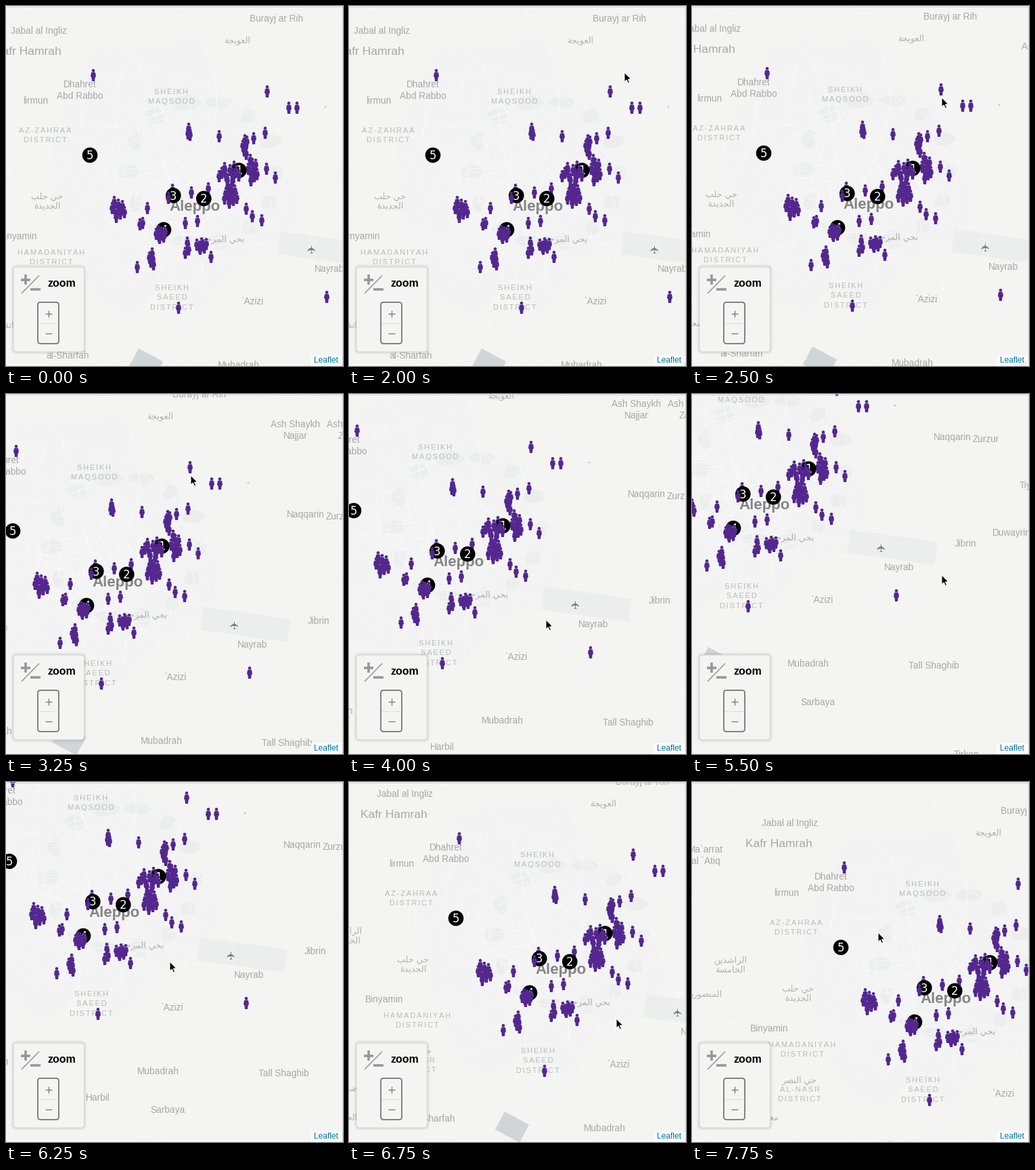
Write a matplotlib script that moves like this. It is 498 by 531 pixels and loops after 8000 ms.

```python
import numpy as np
import matplotlib.pyplot as plt
from matplotlib.animation import FuncAnimation
from matplotlib.collections import LineCollection
from matplotlib.patches import Circle, FancyBboxPatch, PathPatch, Polygon, Rectangle
from matplotlib.path import Path
from matplotlib.transforms import Affine2D

W, H = 498, 531
FRAMES, STEP = 32, 250
SANS = ["Liberation Sans", "DejaVu Sans"]
PURPLE, PLACE, DISTRICT = "#54278f", "#a8a8a8", "#b7baba"

fig = plt.figure(figsize=(W / 72, H / 72), dpi=72)
ax = fig.add_axes([0, 0, 1, 1])
ax.set_xlim(0, W)
ax.set_ylim(H, 0)
ax.axis("off")
fig.patch.set_facecolor("#f4f4f3")

pan = Affine2D()
world = pan + ax.transData
rng = np.random.default_rng(7)


# ---- map ground -------------------------------------------------------
def blob(x, y, rx, ry, color, n=9):
    a = np.linspace(0, 2 * np.pi, n, endpoint=False)
    r = rng.uniform(0.75, 1.1, n)
    ax.add_patch(Polygon(np.c_[x + rx * r * np.cos(a), y + ry * r * np.sin(a)],
                         fc=color, transform=world, zorder=1))


def slab(x, y, w, h, angle, color):
    ax.add_patch(Rectangle((x - w / 2, y - h / 2), w, h, angle=angle, fc=color,
                           rotation_point="center", transform=world, zorder=1))


def streets(count, center, spread, color, lw):
    """Short streets following a locally rotated grid."""
    c = rng.normal(center, spread, (count, 2))
    a = 0.5 * np.sin(c[:, 0] / 70) + 0.4 * np.cos(c[:, 1] / 60)
    a += np.pi / 2 * rng.integers(0, 2, count)
    d = np.c_[np.cos(a), np.sin(a)] * rng.uniform(5, 20, (count, 1))
    ax.add_collection(LineCollection(np.stack([c - d, c + d], 1), colors=color,
                                     linewidths=lw, transform=world, zorder=2))


def highways(x, y, count):
    """Winding radial roads that leave the middle of the city."""
    r = np.linspace(30, 480, 60)
    for k in range(count):
        a = 2 * np.pi * k / count + 0.25 * np.sin(r / 90 + k)
        ax.plot(x + r * np.cos(a), y + r * np.sin(a), color="#f9f9f9", lw=1.1,
                transform=world, zorder=2)


blob(235, 255, 190, 200, "#f2f3f2", 24)
for angle in np.linspace(0, 2 * np.pi, 14, endpoint=False):
    blob(290 + 110 * np.cos(angle), 245 + 105 * np.sin(angle),
         rng.uniform(10, 22), rng.uniform(8, 16), "#eceeee")
slab(468, 358, 130, 34, 8, "#eceded")
slab(207, 528, 41, 30, 28, "#d0d6d8")
streets(560, (240, 260), (85, 95), "#f9f9f9", 0.8)
streets(220, (300, 300), (260, 200), "#f0f1f1", 0.7)
highways(260, 290, 9)
ax.add_patch(Circle((472, 149), 1.6, fc="#cfcfcf", transform=world, zorder=4))


# ---- labels -----------------------------------------------------------
def label(lines, x, y, size=13.6, gap=16.7, color=PLACE, ha="center", family=SANS, **kw):
    for i, line in enumerate(lines.split("/")):
        ax.text(x, y + i * gap + 0.36 * size, line, size=size, color=color, ha=ha,
                va="baseline", family=family, transform=world, zorder=5, **kw)


def district(lines, x, y):
    spaced = "/".join("\u2006".join(s) for s in lines.split("/"))
    label(spaced, x, y, 11, 14.5, DISTRICT)


def arabic_forms():
    """First presentation form and form count of every letter."""
    two = "آأؤإاةدذرزوى"
    forms, code = {}, 0xFE80
    for u in [*range(0x621, 0x63B), *range(0x641, 0x64B)]:
        ch = chr(u)
        n = 1 if u == 0x621 else 2 if ch in two else 4
        forms[ch] = code, n
        code += n
    return forms


FORMS = arabic_forms()


def joined(text):
    """Join the letters and put them in visual order."""
    out = []
    for i, ch in enumerate(text):
        if ch in FORMS:
            code, n = FORMS[ch]
            before = i > 0 and FORMS.get(text[i - 1], (0, 0))[1] == 4
            after = n == 4 and FORMS.get(text[i + 1:i + 2], (0, 0))[1] > 1
            ch = chr(code + before + 2 * after)
        out.append(ch)
    return "".join(reversed(out))


def arab(lines, x, y, size=12.8, ha="center"):
    label("/".join(map(joined, lines.split("/"))), x, y, size, 14, "#b0b2b2", ha,
          "DejaVu Sans")


label("Jabal al Ingliz", 48, 36)
label("Burayj ar Rih", 400, 18)
label("lirmun", 44, 139)
label("Binyamin", 18, 339)
label("`Azizi", 364, 435)
label("Nayrab", 478, 387)
label("Jibrin", 576, 352)
label("Naqqarin", 557, 195)
label("Zurzur", 606, 198)
label("Mubadrah", 344, 529)
label("Tall Shaghib", 529, 532)
label("Sarbaya", 358, 586)
label("al-Sharfah", 91, 515)
label("Harbil", 255, 568)
label("Tirkan", 578, 663)
label("Tiyarah", 656, 266, ha="left")
label("Duwayrinah", 616, 336, ha="left")
label("Kafr Hamrah", 32, 66, 17.4)
label("Aleppo", 279, 294, 22.3, color="#858585", weight="bold")
label("Dhahret/Abd Rabbo", 109, 115)
label("Ash Shaykh/Najjar", 542, 62)
label("Ash Shaykh/Zayyat", 625, 62)
label("Ma`arrat/al `Atiq", -76, 75)
district("SHEIKH/MAQSOOD", 244, 126)
district("AZ-ZAHRAA/DISTRICT", 58, 183)
district("HAMADANIYAH/DISTRICT", 67, 363)
district("SHEIKH/SAEED/DISTRICT", 245, 415)
district("AL-NASR/DISTRICT", 63, 429)
arab("العويجة", 342, 50)
arab("حي حلب/الجديدة", 61, 280)
arab("بحي المرجة", 321, 343)
arab("الراشدين/الخامسة", -39, 238)
arab("حي النصر", 63, 415)
arab("المنصورة", -76, 288)
arab("معراتة عرضة", 32, 470, ha="right")
arab("العامرية", -22, 513, ha="right")
ax.text(452.5, 358, "\u2708", size=16, rotation=90, color="#757575", ha="center",
        va="center", family="DejaVu Sans", transform=world, zorder=5)


# ---- markers ----------------------------------------------------------
side = np.array([(2.6, -4.2), (3.2, -3), (4, 1.8), (2.6, 3.6), (2, 9)])
body = np.r_[side, side[::-1] * (-1, 1)]
PERSON = Path.make_compound_path(Path(body, closed=False), Path.circle((0, -6.7), 2.3))


def depth(y):
    """Markers further south lie on top."""
    return 10 + y / 1000


def person(x, y):
    shape = PERSON.transformed(Affine2D().translate(x, y))
    ax.add_patch(PathPatch(shape, fc=PURPLE, ec="none", transform=world, zorder=depth(y)))


def crowd(n, x, y, rx, ry):
    """People spread evenly over an ellipse by the golden angle."""
    i = np.arange(n)
    r, a = np.sqrt((i + 0.5) / n), 2.4 * i
    for px, py in zip(x + rx * r * np.cos(a), y + ry * r * np.sin(a)):
        person(round(px), round(py))


def stop(digit, x, y):
    ax.add_patch(Circle((x, y), 11.3, fc="black", transform=world, zorder=depth(y)))
    ax.text(x, y + 6, str(digit), size=16.5, color="white", ha="center", va="baseline",
            family="DejaVu Sans", transform=world, zorder=depth(y) + 1e-4)


for spot in [(129, 102), (386, 126), (418, 150), (430, 150), (383, 187), (315, 192),
             (366, 195), (385, 240), (398, 253), (274, 275), (299, 269), (246, 271),
             (240, 283), (209, 298), (265, 320), (283, 317), (355, 299), (364, 310),
             (378, 316), (303, 370), (194, 385), (255, 445), (474, 429)]:
    person(*spot)
crowd(4, 270, 186, 3, 6)
crowd(9, 165, 300, 11, 13)
crowd(2, 200, 320, 3, 4)
crowd(8, 229, 337, 9, 6)
crowd(5, 216, 373, 4, 12)
crowd(7, 289, 353, 9, 5)
crowd(3, 268, 359, 5, 11)
crowd(6, 353, 208, 4, 16)
crowd(9, 364, 242, 8, 18)
crowd(12, 330, 247, 18, 12)
crowd(10, 332, 278, 10, 16)
stop(5, 124, 220)
stop(3, 247.3, 279.5)
stop(2, 292.3, 284)
stop(1, 344.3, 242.5)
stop(4, 233, 330)


# ---- fixed controls ---------------------------------------------------
def box(x0, y0, x1, y1, r, z, **kw):
    ax.add_patch(FancyBboxPatch((x0, y0), x1 - x0, y1 - y0, zorder=z,
                                boxstyle=f"round,pad=0,rounding_size={r}", **kw))


def bar(x0, y0, x1, y1, color, lw):
    ax.plot([x0, x1], [y0, y1], color=color, lw=lw, solid_capstyle="butt", zorder=23)


ICON, EDGE = "#97979b", "#77777b"
for g in range(1, 5):
    box(11 - g, 385 - g, 115.5 + g, 510 + g, 5 + g, 20, fc="black", ec="none", alpha=0.025)
box(11, 385, 115.5, 510, 5, 21, fc="#f4f4f3", ec="#cccccc", lw=0.6)
bar(22, 403.5, 36.5, 403.5, ICON, 3.6)
bar(29.2, 396, 29.2, 411, ICON, 3.6)
bar(23, 424, 49, 397.5, ICON, 1.5)
bar(36.5, 418, 51, 418, ICON, 3.6)
ax.text(61.5, 414, "zoom", size=16, weight="bold", family=SANS, zorder=23)
box(47, 437, 78, 498, 4, 22, fc="#f4f4f3", ec=EDGE, lw=1.8)
bar(48, 467.5, 77, 467.5, "#dcdcdc", 1)
bar(58, 454, 68.5, 454, EDGE, 1.3)
bar(63.2, 448.8, 63.2, 459.2, EDGE, 1.3)
bar(58.5, 482.5, 68, 482.5, EDGE, 1.3)

ax.add_patch(Rectangle((450, 515), 47, 16, fc="white", alpha=0.7, zorder=20))
ax.text(455, 526.5, "Leaflet", size=12, color="#0078a8", family=SANS, zorder=23)
bar(0, 0.5, W, 0.5, "#d2d2d2", 1)
bar(497.5, 0, 497.5, H, "#d2d2d2", 1)

ARROW = np.array([(0, 0), (0, 14), (3.2, 11), (5.4, 16), (7.6, 15), (5.4, 10.2), (9.8, 9.8)])
cursor = Polygon(ARROW, fc="black", ec="white", lw=1, zorder=30)
ax.add_patch(cursor)

# ---- motion: step and cursor place; every second leg drags the map ------
STOPS = [(1, 342, 44), (5, 407, 98), (8, 407, 98), (9, 387, 138), (13, 273, 120),
         (15, 294, 363), (18, 282, 247), (20, 415, 265), (22, 369, 267),
         (24, 189, 236), (27, 395, 349), (29, 213, 179), (31, 275, 222)]


def pose(n):
    """Cursor place and map offset at step n."""
    place, offset = np.array(STOPS[0][1:], float), np.zeros(2)
    for leg, (a, b) in enumerate(zip(STOPS, STOPS[1:])):
        u = np.clip((n - a[0]) / (b[0] - a[0]), 0, 1)
        move = np.subtract(b[1:], a[1:]) * u * u * (3 - 2 * u)
        place += move
        offset += move * (leg % 2)
    return np.round(place), np.round(offset)


def draw(n):
    place, offset = pose(n)
    pan.clear().translate(*offset)
    cursor.set_xy(ARROW + place)
    cursor.set_visible(n > 0)
    return []


anim = FuncAnimation(fig, draw, frames=FRAMES, interval=STEP, repeat=True,
                     repeat_delay=0, blit=False)
plt.show()
```
